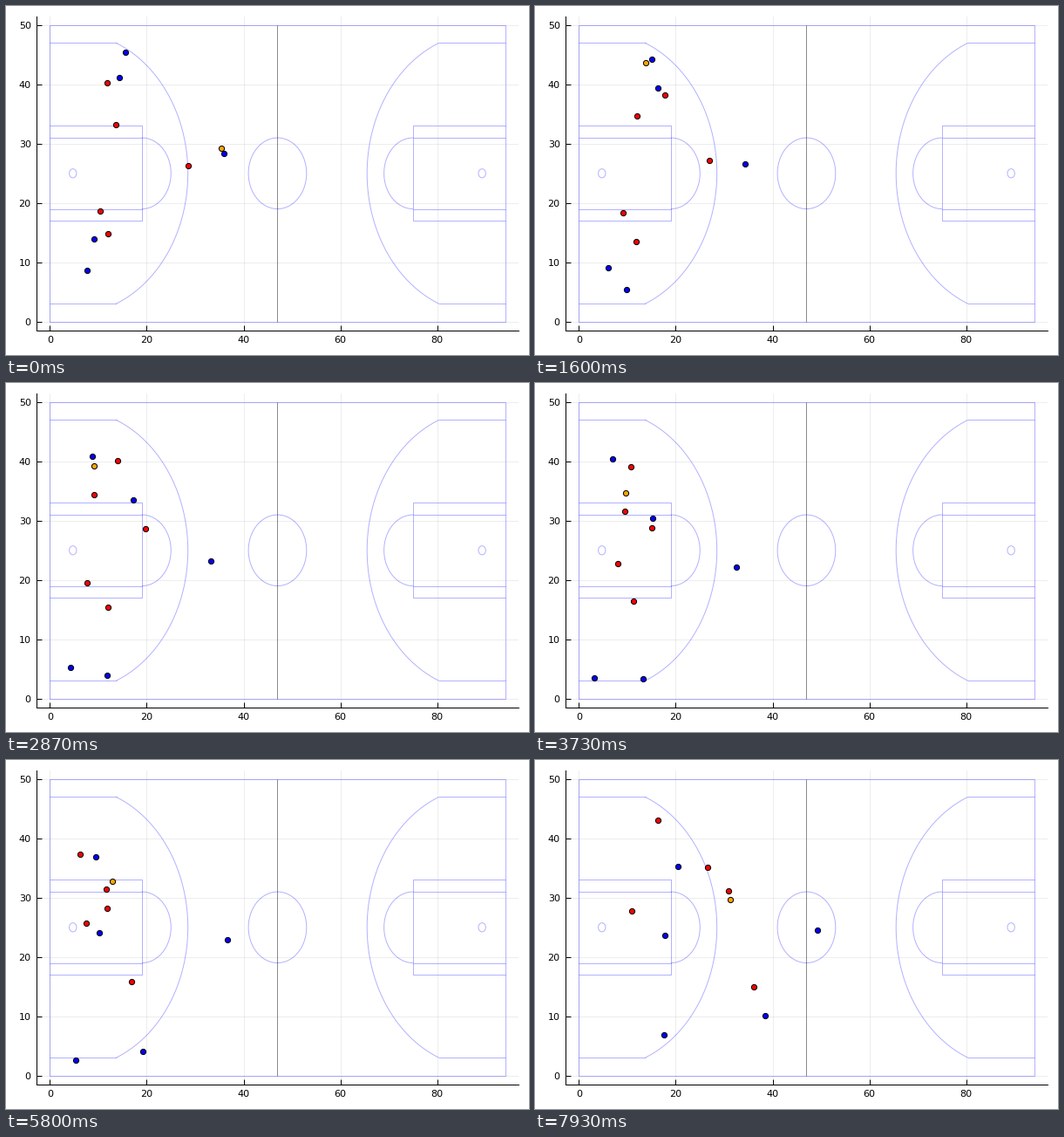
A matplotlib script that plays this animation: 600x400 px, repeating every 8 s.

```python
import numpy as np
import matplotlib
import matplotlib.pyplot as plt
from matplotlib.animation import FuncAnimation

W, H, DPI = 600, 400, 100
LOOP, FRAMES = 8000, 120
PX = 72 / DPI  # points per pixel

matplotlib.rcParams["font.family"] = "DejaVu Sans"

fig = plt.figure(figsize=(W / DPI, H / DPI), dpi=DPI, facecolor="white")

# --- court -------------------------------------------------------------
L, R, T, B = 34.7, 588.2, 11.9, 371.7
ax = fig.add_axes([L / W, 1 - B / H, (R - L) / W, (B - T) / H])
ax.set_xlim(-2.82, 96.82)
ax.set_ylim(-1.5, 51.5)
ax.set_xticks(range(0, 81, 20))
ax.set_yticks(range(0, 51, 10))
ax.tick_params(direction="in", length=6 * PX, width=PX, labelsize=8, pad=6 * PX)
ax.grid(color="black", alpha=0.1, lw=0.7 * PX)
ax.set_axisbelow(True)
for side in ("top", "right"):
    ax.spines[side].set_visible(False)
for side in ("left", "bottom"):
    ax.spines[side].set_linewidth(PX)


def line(xs, ys, color="blue", alpha=0.3):
    ax.plot(xs, ys, color=color, alpha=alpha, lw=PX, solid_capstyle="butt")


def arc(cx, r, a0, a1, flip):
    a = np.radians(np.linspace(a0, a1, 120))
    line(flip(cx + r * np.cos(a)), 25 + r * np.sin(a))


def half(flip):
    def seg(xs, ys):
        line(flip(np.array(xs, float)), ys)

    seg([0, 19, 19, 0], [17, 17, 33, 33])
    seg([0, 19], [19, 19])
    seg([0, 19], [31, 31])
    arc(19, 6, -90, 90, flip)
    arc(4.75, 0.75, 0, 360, flip)
    edge = np.degrees(np.arcsin(22 / 23.75))
    arc(4.75, 23.75, -edge, edge, flip)
    seg([0, 13.8], [3, 3])
    seg([0, 13.8], [47, 47])


line([0, 94, 94, 0, 0], [0, 0, 50, 50, 0])
line([47, 47], [0, 50], "black", 0.45)
arc(47, 6, 0, 360, lambda x: x)
half(lambda x: x)
half(lambda x: 94 - x)

# --- players and ball, in stage pixels ---------------------------------
TIMES = [0, 1600, 2867, 4600, 5800, 7000, 7933]

BLUES = [
    [(137, 52.5), (134, 61), (99, 84), (88, 89.5), (103, 111), (132.7, 123.5), (166.5, 121.5)],
    [(130, 82), (140.5, 93.5), (145.5, 134), (118, 175.5), (106.7, 198.3), (120, 203.5), (151, 201)],
    [(250, 169), (241.3, 181.3), (234.8, 204), (233.2, 217.7), (254.3, 205.7), (289, 197.6), (326.3, 194.8)],
    [(101, 267.3), (84, 300.2), (73.5, 326), (66.5, 346), (79.5, 344.3), (113.3, 334), (150.5, 314)],
    [(93, 303.3), (105.2, 324.6), (116.3, 335.4), (134.5, 339.6), (156.8, 333.5), (214.2, 309), (267.7, 291.8)],
]
REDS = [
    [(116.3, 88.2), (149.3, 101.6), (128, 89), (91, 107), (84.7, 107.6), (105.8, 84.6), (143.3, 68.2)],
    [(209, 183.3), (200.3, 176.8), (160.4, 166.8), (112.2, 168.2), (115.7, 169.8), (170, 154.7), (226.2, 149.4)],
    [(126.2, 135.6), (116.5, 125.6), (100.7, 128), (109.6, 166), (115, 148.2), (151.6, 120.6), (201.5, 123.7)],
    [(108, 234.7), (100.6, 237), (93, 229.2), (97.2, 183.7), (92, 187), (98.2, 179), (111.7, 172.6)],
    [(117.4, 260.8), (115.5, 269.8), (116.5, 257), (114, 246.8), (144.3, 253.6), (203, 259.6), (255, 260.2)],
]
BALL = [(246.5, 163.3), (126.6, 64.6), (101, 95.4), (115.7, 153), (121.7, 138.9), (173.8, 161), (228, 159.7)]


def track(points, extra=None):
    """Smooth path through timed points, sampled once per frame."""
    keys = sorted(list(zip(TIMES, points)) + (extra or []))
    t = np.array([k[0] for k in keys], float)
    p = np.array([k[1] for k in keys], float)
    m = np.gradient(p, t, axis=0)
    now = np.arange(FRAMES) * LOOP / FRAMES
    i = np.clip(np.searchsorted(t, now, side="right") - 1, 0, len(t) - 2)
    h = (t[i + 1] - t[i])[:, None]
    u = (now[:, None] - t[i][:, None]) / h
    return ((1 + 2 * u) * (1 - u) ** 2 * p[i] + u * (1 - u) ** 2 * h * m[i]
            + u * u * (3 - 2 * u) * p[i + 1] + u * u * (u - 1) * h * m[i + 1])


stage = fig.add_axes([0, 0, 1, 1])
stage.set_xlim(0, W)
stage.set_ylim(H, 0)
stage.axis("off")

pause = [(3800, (230.5, 212))]
catch = [(1000, (129.5, 61))]
teams = [
    ("blue", [track(p, pause if n == 2 else None) for n, p in enumerate(BLUES)]),
    ("red", [track(p) for p in REDS]),
    ("orange", [track(BALL, catch)]),
]
dots = []
for color, paths in teams:
    for path in paths:
        dot, = stage.plot([], [], "o", ms=6.2 * PX, mfc=color, mec="black", mew=PX)
        dots.append((dot, path))


def draw(k):
    for dot, path in dots:
        dot.set_data([path[k, 0]], [path[k, 1]])
    return [dot for dot, _ in dots]


anim = FuncAnimation(fig, draw, frames=FRAMES, interval=LOOP / FRAMES,
                     repeat=True, repeat_delay=0, blit=False)
plt.show()
```
